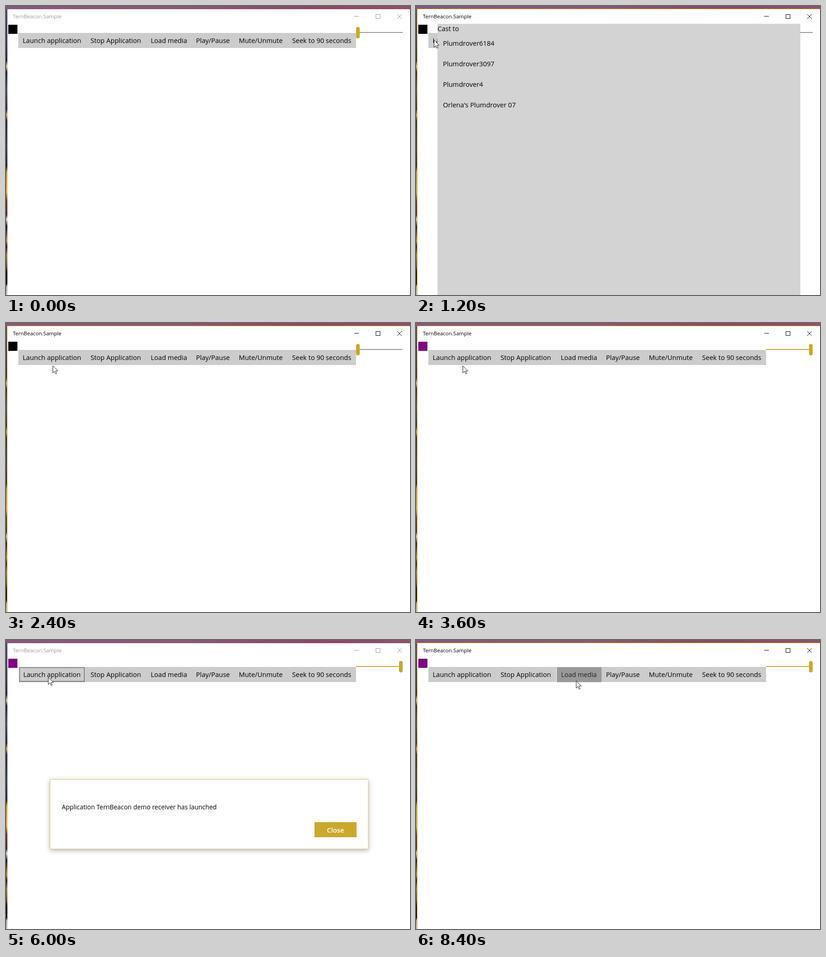
Write an HTML page that moves like this. It is 884 px wide and 633 px high and loops after 9000 ms.

```html
<!DOCTYPE html>
<html lang="en">
<head>
<meta charset="utf-8">
<title>Cast demo</title>
<style>
  :root { --gold: #caa82a; }
  html, body { margin: 0; width: 100%; height: 100%; overflow: hidden; }
  body { position: relative; font: 14.55px/20px "Open Sans", "Noto Sans", sans-serif; color: #000; background: #fff; }
  body *, body { box-sizing: border-box; }
  .abs, .bar, .panel, .dialog, .cursor { position: absolute; white-space: nowrap; }

  /* every moving part shares one 9 s clock of fifteen hard steps */
  .anim { animation: 9s step-end infinite; }

  .sky { left: 0; top: 0; width: 100%; height: 7px; background: linear-gradient(90deg, #86597c, #8a5873 45%, #8c4763 75%, #93506a); }
  .city { left: 0; top: 7px; width: 3px; bottom: 0;
    background: linear-gradient(#56466e, #33366a 12%, #23283f 18%, #d8c48a 20%, #1e2436 22%, #4a566c 28%,
      #23293a 35%, #d4a23a 37%, #222a38 39%, #30405a 48%, #20242c 55%, #c8942f 57%, #dcae4a 64%,
      #6b3a22 67%, #4a2c22 72%, #e0d8c8 73.5%, #15161a 76%, #b98a35 81%, #241d1a 83%, #a57f48 86%,
      #6a5030 90%, #0c0c10 92%, #0c0c10 96%, #a8a8ac 97%, #c4c4c6); }

  .win { left: 3px; top: 7px; right: 0; bottom: 0; background: #fff; color: #999; animation-name: focus; }
  .win .title { left: 12px; top: 6px; font-size: 11.5px; }
  .win svg { left: 758px; top: 10px; fill: none; stroke: currentColor; }
  @keyframes focus {
    0%, 66.666% { color: #999; box-shadow: none; }
    6.666%, 86.666% { color: #000; box-shadow: 0 0 0 1px var(--gold); }
  }

  .cast { left: 5px; top: 41px; width: 20px; height: 20px; background: #000; animation-name: linked; }
  @keyframes linked { 0% { background: #000; } 40% { background: #800080; } }

  .bar { left: 26.5px; top: 59px; height: 33px; display: flex; line-height: 33px; text-align: center; }
  .bar span { background: #ccc; }
  .slot { background: #fff; }
  .slot span { display: block; }
  .launch { animation-name: launch; }
  .load { animation-name: load; }
  @keyframes launch {
    0%, 73.333% { transform: none; background: #ccc; box-shadow: none; color: #000; }
    46.666% { transform: none; background: #ccc; box-shadow: inset 0 0 0 2px #7a7c7b; color: #000; }
    53.333% { transform: scale(.98); background: #999; box-shadow: none; color: #222; }
    60%, 66.666% { transform: scale(.98); background: #ccc; box-shadow: inset 0 0 0 2px #7a7c7b; color: #000; }
  }
  @keyframes load {
    0% { transform: none; background: #ccc; box-shadow: none; color: #000; }
    86.666% { transform: none; background: #ccc; box-shadow: inset 0 0 0 2px #7a7c7b; color: #000; }
    93.333% { transform: scale(.98); background: #999; box-shadow: none; color: #222; }
  }

  .track { left: 766px; top: 57px; width: 102px; height: 2px; background: #9b969b; animation-name: track; }
  .thumb { left: 766px; top: 46px; width: 8px; height: 25px; border-radius: 4px; background: var(--gold); animation-name: thumb; }
  @keyframes track { 0% { background: #9b969b; } 40% { background: var(--gold); } }
  @keyframes thumb { 0% { transform: none; } 40% { transform: translateX(94px); } }

  .panel { left: 47px; top: 39px; width: 794px; bottom: 0; background: #d3d3d3; visibility: hidden; animation-name: panel; }
  .panel p { margin: 0; height: 45px; padding-left: 12px; line-height: 45px; }
  .panel p span { display: inline-block; }
  .first { animation-name: first; }
  .first span { animation-name: shrink; }
  @keyframes panel { 0%, 26.666% { visibility: hidden; } 13.333% { visibility: visible; } }
  @keyframes first { 0%, 26.666% { background: #d3d3d3; } 20% { background: #a9a9a9; } }
  @keyframes shrink { 0%, 26.666% { transform: none; } 20% { transform: scale(.98); } }

  .dialog { left: 96px; top: 305px; width: 697px; height: 153px; background: #fff; border: 1px solid #e2cd7c;
    box-shadow: 0 3px 10px rgba(0, 0, 0, .3); visibility: hidden; animation-name: dialog; }
  .dialog .msg { left: 25px; top: 49.5px; font-size: 13.9px; }
  .close { left: 578px; top: 93px; width: 92px; height: 33px; line-height: 34px; text-align: center;
    font-weight: 600; color: #fff; background: var(--gold); animation-name: close; }
  @keyframes dialog { 0%, 86.666% { visibility: hidden; } 66.666% { visibility: visible; } }
  @keyframes close {
    0% { background: var(--gold); box-shadow: none; }
    73.333% { background: var(--gold); box-shadow: inset 0 0 0 2px #86701c; }
    80% { background: #97801f; box-shadow: none; }
  }

  .cursor { left: 0; top: 0; animation-name: cursor; }
  @keyframes cursor {
    0% { transform: translate(-40px, -40px); }
    6.666% { transform: translate(18px, 50px); }
    13.333% { transform: translate(39px, 74px); }
    20% { transform: translate(102px, 93px); }
    46.666% { transform: translate(92px, 81px); }
    73.333% { transform: translate(722px, 424px); }
    86.666% { transform: translate(350px, 89px); }
  }
</style>
</head>
<body>
  <div class="abs sky"></div>
  <div class="abs city"></div>

  <div class="abs win anim">
    <div class="abs title">TernBeacon.Sample</div>
    <svg class="abs" width="110" height="14">
      <path d="M1 5.5h10M48.5 1.5h9v9h-9z" shape-rendering="crispEdges"/>
      <path d="M95 1l10 10m0-10l-10 10"/>
    </svg>
  </div>

  <div class="abs cast anim"></div>
  <div class="bar">
    <div class="slot"><span class="launch anim" style="width:147px">Launch application</span></div>
    <span style="width:133.5px">Stop Application</span>
    <div class="slot"><span class="load anim" style="width:99px">Load media</span></div>
    <span style="width:93.5px">Play/Pause</span>
    <span style="width:116px">Mute/Unmute</span>
    <span style="width:150.5px">Seek to 90 seconds</span>
  </div>
  <div class="abs track anim"></div>
  <div class="abs thumb anim"></div>

  <div class="panel anim">
    <div>Cast to</div>
    <p class="first anim"><span class="anim">Plumdrover6184</span></p>
    <p>Plumdrover3097</p>
    <p>Plumdrover4</p>
    <p>Orlena's Plumdrover 07</p>
  </div>

  <div class="dialog anim">
    <div class="abs msg">Application TernBeacon demo receiver has launched</div>
    <div class="abs close anim">Close</div>
  </div>

  <svg class="cursor anim" width="14" height="21">
    <path d="M.5 .8v15.6l3.7-3.5 2.5 5.6 2.4-1-2.4-5.5h5z" fill="#fff" stroke="#222"/>
  </svg>
</body>
</html>
```
